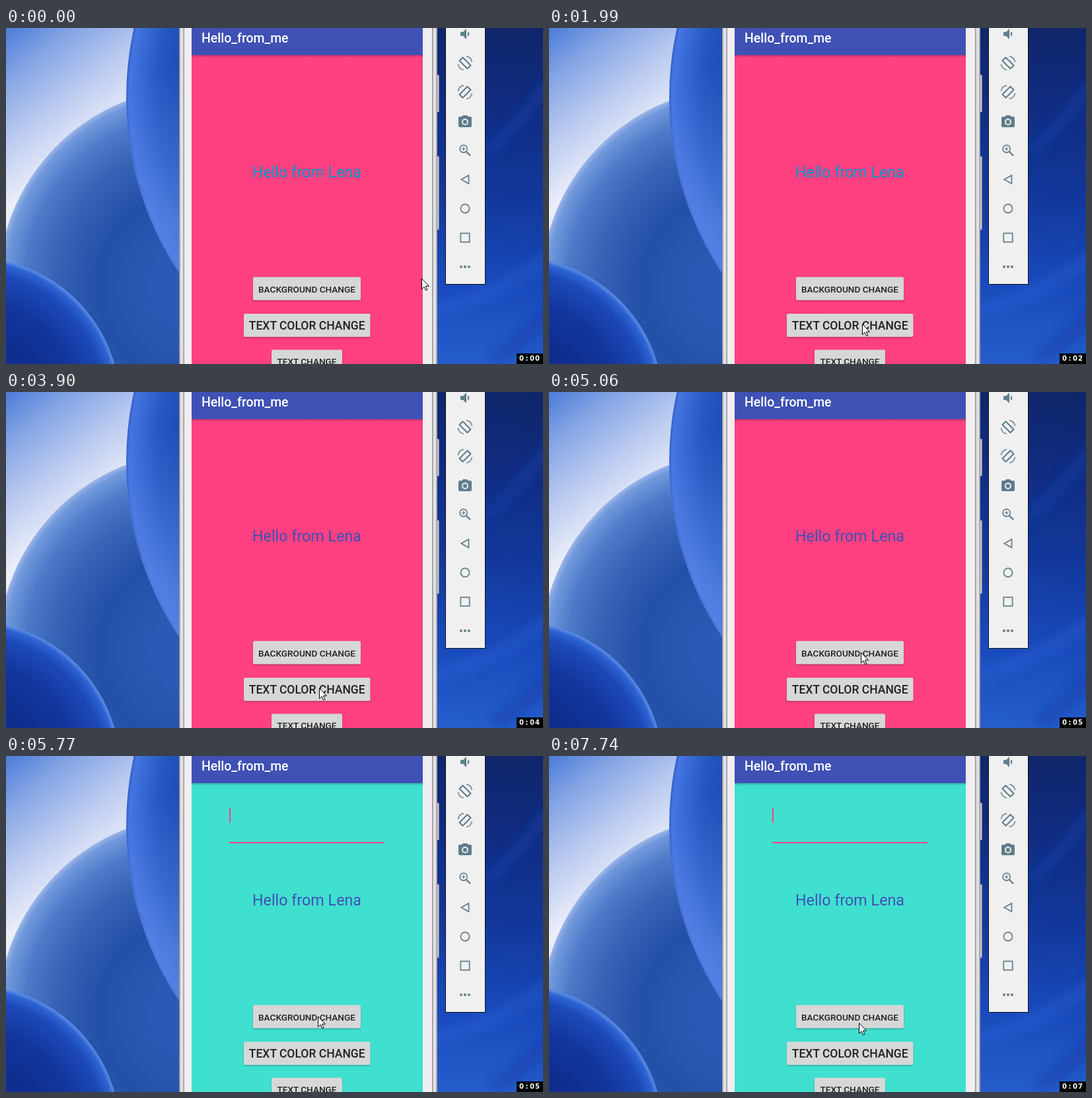
Animation, 813 px wide and 508 px high, one loop 8 s. Source, as an HTML page:

```html
<!DOCTYPE html>
<html lang="en">
<head>
<meta charset="utf-8">
<title>Hello_from_me</title>
<style>
  html, body { margin: 0; width: 100%; height: 100%; overflow: hidden; background: #1b4cb4; }
  svg { display: block; width: 813px; height: 508px; }
  text { font-family: Roboto, "Open Sans", sans-serif; }
  .label { font-size: 13.6px; font-weight: 500; text-anchor: middle; fill: #212121; }
  .timer { font: bold 10px "DejaVu Sans", sans-serif; fill: #fff; }
</style>
</head>
<body>
<svg viewBox="0 0 813 508" xmlns="http://www.w3.org/2000/svg">
  <defs>
    <linearGradient id="sky" gradientUnits="userSpaceOnUse" x1="0" y1="0" x2="134" y2="174">
      <stop offset="0" stop-color="#4b7cd8"/><stop offset=".3" stop-color="#87a6e5"/>
      <stop offset=".62" stop-color="#b9c9f0"/><stop offset="1" stop-color="#eceff9"/>
    </linearGradient>
    <radialGradient id="ballA" gradientUnits="userSpaceOnUse" cx="661" cy="105" r="479">
      <stop offset=".82" stop-color="#1c4bb2"/><stop offset=".9" stop-color="#2457c2"/>
      <stop offset=".975" stop-color="#3f6fdb"/><stop offset=".99" stop-color="#4775df"/>
      <stop offset="1" stop-color="#2f5fc9"/>
    </radialGradient>
    <linearGradient id="glow" x1="0" y1="0" x2="0" y2="1">
      <stop offset=".15" stop-color="#5a86e6" stop-opacity="0"/>
      <stop offset=".8" stop-color="#5a86e6" stop-opacity=".65"/>
    </linearGradient>
    <radialGradient id="ballB" gradientUnits="userSpaceOnUse" cx="290" cy="392" r="302">
      <stop offset=".2" stop-color="#2b5ab6"/><stop offset=".5" stop-color="#2350a8"/>
      <stop offset=".72" stop-color="#3764b6"/><stop offset=".87" stop-color="#4d7bc9"/>
      <stop offset=".97" stop-color="#7199dc"/><stop offset="1" stop-color="#9db5e7"/>
    </radialGradient>
    <radialGradient id="ballC" gradientUnits="userSpaceOnUse" cx="-50" cy="570" r="223">
      <stop offset=".45" stop-color="#0f2e90"/><stop offset=".7" stop-color="#12359c"/>
      <stop offset=".9" stop-color="#1c49b8"/><stop offset=".97" stop-color="#2d62d2"/>
      <stop offset="1" stop-color="#608fe8"/>
    </radialGradient>
    <linearGradient id="deep" gradientUnits="userSpaceOnUse" x1="740" y1="0" x2="705" y2="508">
      <stop offset="0" stop-color="#10266b"/><stop offset=".2" stop-color="#102b7e"/>
      <stop offset=".5" stop-color="#12389c"/><stop offset=".76" stop-color="#194abc"/>
      <stop offset="1" stop-color="#255dcb"/>
    </linearGradient>
    <linearGradient id="barShade" x1="0" y1="0" x2="0" y2="1">
      <stop offset="0" stop-color="#000" stop-opacity=".22"/><stop offset="1" stop-color="#000" stop-opacity="0"/>
    </linearGradient>
    <linearGradient id="metal">
      <stop offset="0" stop-color="#77767b"/><stop offset=".2" stop-color="#c5c4c8"/>
      <stop offset=".5" stop-color="#efeef0"/><stop offset=".75" stop-color="#d0cfd3"/>
      <stop offset="1" stop-color="#85848a"/>
    </linearGradient>
    <filter id="soft" x="-20%" y="-20%" width="140%" height="140%"><feGaussianBlur stdDeviation="8"/></filter>
    <filter id="shade" x="-10%" y="-20%" width="120%" height="150%"><feGaussianBlur stdDeviation="1.3"/></filter>
    <clipPath id="leftSide"><path d="M0 0H263V508H0Z"/></clipPath>
    <clipPath id="rightSide"><path d="M652 0H813V508H652Z"/></clipPath>
  </defs>

  <g clip-path="url(#leftSide)">
    <path fill="url(#sky)" d="M0 0H263V508H0Z"/>
    <circle cx="290" cy="392" r="302" fill="url(#ballB)"/>
    <circle cx="-50" cy="570" r="223" fill="url(#ballC)"/>
    <circle cx="661" cy="105" r="479" fill="url(#ballA)"/>
    <path fill="url(#glow)" d="M193 0A479 479 0 0 0 263 372V0Z"/>
  </g>
  <g clip-path="url(#rightSide)">
    <path fill="url(#deep)" d="M652 0H813V508H652Z"/>
    <g fill="none" filter="url(#soft)" stroke-width="18">
      <path stroke="#1a43ae" opacity=".5" d="M725 190Q775 150 820 85"/>
      <path stroke="#2a62d4" opacity=".45" d="M640 430Q740 410 830 340"/>
      <path stroke="#143a9f" opacity=".5" d="M740 500Q790 470 830 420"/>
    </g>
  </g>

  <g stroke="#77767c" stroke-width=".8">
    <rect x="651" y="71" width="4.6" height="56" rx="1" fill="#c9c9cf"/>
    <rect x="651" y="194" width="4.6" height="111" rx="1" fill="#c9c9cf"/>
  </g>
  <path fill="#f0eef0" d="M262 0H653V508H262Z"/>
  <path fill="url(#metal)" d="M262 0H270V508H262Z"/>
  <path fill="url(#metal)" d="M645 0H653V508H645Z"/>

  <path id="screen" d="M281 41H631V508H281Z"/>
  <path fill="url(#barShade)" d="M281 41H631V45H281Z"/>
  <path fill="#3f51b5" d="M281 0H631V41H281Z"/>
  <text x="296" y="22" font-size="19.44" font-weight="500" fill="#fff">Hello_from_me</text>
  <g id="field" fill="#ff4081">
    <path d="M338 130H573V132H338Z"/>
    <path id="caret" d="M338 78H340V101H338Z"/>
  </g>
  <text id="greeting" x="455.5" y="226" font-size="23.3" text-anchor="middle">Hello from Lena</text>
  <g id="buttons"></g>

  <path d="M665.5 -1H725.5V387.5H665.5Z" fill="#f0f0f0" stroke="#111"/>
  <g id="tools" fill="#607d8b"></g>

  <path d="M773 492H813V508H773Z"/>
  <text class="timer" id="timer" x="777 786.5 793 801" y="503.3">0:00</text>
  <path id="pointer" fill="#fff" stroke="#000" stroke-linejoin="miter"
        d="M.5 .8V16.6L4.1 13.2 6.6 18.7 8.9 17.7 6.5 12.3H11.4Z"/>
</svg>
<script>
const NS = 'http://www.w3.org/2000/svg';
const LOOP = 8000;
const $ = id => document.getElementById(id);

function add(parent, tag, attrs, text = '') {
  const node = document.createElementNS(NS, tag);
  for (const [key, value] of Object.entries(attrs)) node.setAttribute(key, value);
  node.textContent = text;
  return parent.appendChild(node);
}

function addButton(label, x, y, width, height, size, baseline) {
  const box = { x, y, width, height, rx: 2 };
  const shadow = add($('buttons'), 'rect', { ...box, y: y + 1.5, filter: 'url(#shade)', opacity: .3 });
  const face = add($('buttons'), 'rect', box);
  add($('buttons'), 'text', { class: 'label', x: x + width / 2, y: baseline, style: `font-size:${size}px` }, label);
  return level => {
    const grey = Math.round(214 - 27 * level);
    face.setAttribute('fill', `rgb(${grey},${grey + 1},${grey + 1})`);
    shadow.setAttribute('opacity', .25 + .25 * level);
  };
}

const pressBackground = addButton('BACKGROUND CHANGE', 374, 376.5, 163, 35, 13.6, 399.5);
const pressColor = addButton('TEXT COLOR CHANGE', 360, 432, 191.5, 35, 17.5, 456.3);
addButton('TEXT CHANGE', 402, 486.5, 107, 35, 13.6, 509)(0);

// Toolbar icons are drawn around their own centre, 44 px apart.
const rotate = '<g fill="none" stroke="#607d8b" stroke-width="2">' +
  '<path d="M-3.5 -8.5L8.5 3.5 3.5 8.5 -8.5 -3.5Z" stroke-linejoin="round"/>' +
  '<path d="M-10.5 1.5A10.5 10.5 0 0 0 -2 10.3M10.5 -1.5A10.5 10.5 0 0 0 2 -10.3" stroke-width="1.5"/></g>';
const outline = shape => `<g fill="none" stroke="#607d8b" stroke-width="1.7">${shape}</g>`;
const icons = [
  '<path d="M-7 -3V3H-3L2 8V-8L-3 -3ZM4 -4V4A4.5 4.5 0 0 0 4 -4Z"/>',
  rotate,
  `<g transform="scale(-1 1)">${rotate}</g>`,
  '<path fill-rule="evenodd" d="M-3 -9L-4.8 -7H-8A2 2 0 0 0 -10 -5V7A2 2 0 0 0 -8 9H8A2 2 0 0 0 10 7V-5A2 2 0 0 0 8 -7H4.8L3 -9ZM-5 1A5 5 0 1 1 5 1 5 5 0 1 1 -5 1Z"/><circle cy="1" r="3.1"/>',
  outline('<circle cx="-2.3" cy="-2.3" r="5.6"/><path d="M-5 -2.3H.4M-2.3 -5V.4" stroke-width="1.3"/><path d="M2 2L8 8" stroke-width="2.4"/>'),
  outline('<path d="M5.5 -6.3V6.3L-5.8 0Z"/>'),
  outline('<circle r="6.6"/>'),
  outline('<path d="M-6.7 -6.7H6.7V6.7H-6.7Z"/>'),
  [-6, 0, 6].map(x => `<circle cx="${x}" r="2"/>`).join('')
];
icons.forEach((shape, i) => {
  add($('tools'), 'g', { transform: `translate(695 ${9 + 44 * i})` }).innerHTML = shape;
});

// Each row: start time, then the value held until the next row.
const pointerPath = [
  [0, 629, 378], [280, 629, 375], [420, 600, 378], [540, 535, 393],
  [690, 515, 405], [810, 498, 414], [950, 490, 425], [1060, 484, 434],
  [1180, 479, 441], [1300, 476, 446], [1410, 474, 447],
  [4040, 474, 440], [4160, 473, 420], [4280, 472, 400], [4400, 472, 393],
  [6750, 469, 401], [6880, 469, 403]
];
const colorPress = [[0, 0], [2260, 1], [2380, .5], [2500, 0]];
const backgroundPress = [[0, 0], [5190, 1], [5340, .45], [5490, 0]];
const seconds = [0, 950, 1990, 2930, 3900, 5060, 6050, 7030];
const caretToggles = [5190, 5340, 5770, 6320, 6750, 7310, 7740];
const textChange = 2380, screenChange = 5190;

const held = (rows, t) => rows.findLast(row => row[0] <= t);
const passed = (times, t) => times.filter(time => time <= t).length;

function render(t) {
  const teal = t >= screenChange;
  $('screen').setAttribute('fill', teal ? '#40e0d0' : '#ff4081');
  $('field').setAttribute('visibility', teal ? 'visible' : 'hidden');
  $('caret').setAttribute('opacity', passed(caretToggles, t) % 2);
  $('greeting').setAttribute('fill', t >= textChange ? '#3f51b5' : '#0099cc');
  pressColor(held(colorPress, t)[1]);
  pressBackground(held(backgroundPress, t)[1]);
  $('timer').textContent = '0:0' + (passed(seconds, t) - 1);
  const [, x, y] = held(pointerPath, t);
  $('pointer').setAttribute('transform', `translate(${x} ${y})`);
}

const start = performance.now();
function tick() {
  render((performance.now() - start) % LOOP);
  requestAnimationFrame(tick);
}
tick();
</script>
</body>
</html>
```
